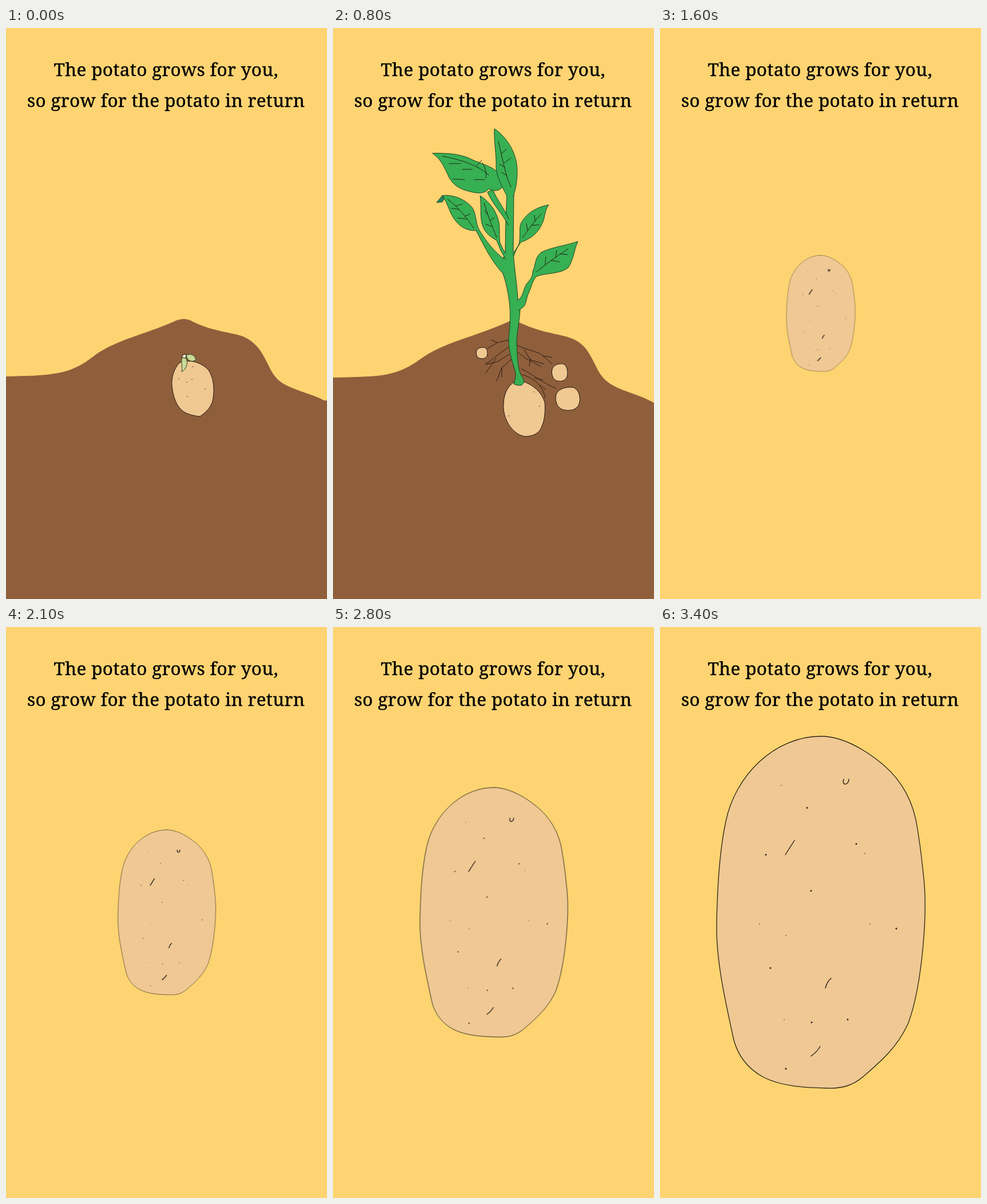
These frames come from a looping animation (561x998 px, 3.5 s). An HTML page without scripts:

```html
<!DOCTYPE html>
<html lang="en">
<head>
<meta charset="utf-8">
<title>The potato grows</title>
<style>
  html, body { margin: 0; width: 100%; height: 100%; overflow: hidden; background: #fed472; }
  svg { display: block; width: 100%; height: 100%; }
  text { font: 500 31.5px "Noto Serif", serif; letter-spacing: .32px; text-anchor: middle; stroke: #000; stroke-width: .4; }
  path { stroke-linejoin: round; stroke-linecap: round; }
  .soil { fill: #8f5f3c; }
  .tuber { fill: #f0c892; stroke: #1d150c; stroke-width: 1; }
  .green { fill: #37af53; stroke: #14351d; stroke-width: .9; }
  .line { fill: none; stroke: #1d150c; stroke-width: .9; }
  .dots { fill: none; stroke: #2a2015; stroke-width: 1.6; }
  #spud, .scar { vector-effect: non-scaling-stroke; }

  /* each growth stage holds for 200 ms */
  .stage { visibility: hidden; animation: flash 3.5s step-end infinite; animation-delay: calc(var(--i) * 200ms); }
  @keyframes flash {
    0% { visibility: visible; }
    5.7142%, 100% { visibility: hidden; }
  }
  .ground { animation: ground 3.5s step-end infinite; }
  @keyframes ground {
    0% { visibility: visible; }
    45.714%, 100% { visibility: hidden; }
  }
  /* the harvested potato swells in 100 ms steps */
  .harvest { transform-origin: 281px 498.8px; animation: swell 3.5s infinite; }
  @keyframes swell {
    0% { visibility: hidden; transform: scale(.33); animation-timing-function: step-end; }
    45.714% { visibility: visible; transform: scale(.33); animation-timing-function: steps(5); }
    59.999% { visibility: visible; transform: scale(.469); animation-timing-function: steps(7); }
    79.999% { visibility: visible; transform: scale(.709); animation-timing-function: steps(6); }
    97.142%, 100% { visibility: visible; transform: scale(1); }
  }
</style>
</head>
<body>
<svg viewBox="0 0 561 998" preserveAspectRatio="none">
<defs>
  <path id="spud" class="tuber" d="M-9.5-3C-8-9 0-10.5 5-9.5C10-7 10.5 0 9.5 4C8 9 3 10.5-2 9.7C-8 9-10.5 3-9.5-3Z"/>

  <g id="seed">
    <path class="tuber" d="M303 585C293 597 289 610 290 626C292 645 298 662 311 671C320 676 330 678 339 679C350 671 360 662 362 647C365 628 362 610 354 598C344 587 324 577 303 585Z"/>
    <path class="dots" d="M326 592h0M302 613h0M325 614h0M316 619h0M348 631h0M317 644h0"/>
  </g>

  <!-- young plant -->
  <g id="bulb">
    <path class="tuber" d="M317 618C303 628 297 643 298 665C300 690 317 712 337 714C351 713 361 708 365 696C371 684 371 662 370 654C365 637 350 624 333 618Z"/>
    <path class="dots" d="M351 636h0M307 678h0M361 661h0"/>
  </g>
  <path id="trunk" class="green" d="M316 622C318 613 321 607 318 599C313 582 307 565 307 545C309 520 311 500 308 478C305 455 300 435 293 419L301 390L302 335L304 290L316 291L315 390C317 425 323 455 323 478L327 493C325 520 321 535 321 550C322 570 322 592 329 608C336 615 334 621 330 624Q322 626 316 622Z"/>
  <g id="topLeaf">
    <path class="green" d="M304 294C297 280 287 262 285 245C286 220 281 200 282 176C303 190 322 218 322 250C322 272 318 285 315 294"/>
    <path class="line" d="M289 198C296 225 300 255 311 278M295 219l8-7M299 236l12-9M300 243l-9-5M304 258l-10-6"/>
  </g>
  <g id="smallRight">
    <path class="green" d="M315 394C320 385 326 380 326 372C328 358 324 346 331 337C342 321 357 313 377 309C369 321 371 332 365 343C358 360 342 370 329 374C324 380 320 387 316 398"/>
    <path class="line" d="M331 367C341 353 352 337 364 325M340 354l-2-12M347 345l13-1M353 337l-1-10"/>
  </g>
  <g id="bigRight">
    <path class="green" d="M322 476C333 471 332 457 338 448C344 440 349 436 349 426C355 412 352 402 364 392C382 383 408 380 428 373C421 388 421 404 411 419C398 430 372 428 356 434C349 440 347 452 342 463C338 470 338 484 332 488L324 494"/>
    <path class="line" d="M356 426C373 412 392 398 411 386M371 413l1-13M381 406l15 3M389 400l2-11M397 395l13 1"/>
  </g>
  <g id="centerLeaf">
    <path class="green" d="M302 404C295 394 291 384 286 371C276 366 265 358 261 344C256 328 260 312 257 293C274 304 286 320 290 340C292 354 290 366 292 376C296 383 298 390 302 394"/>
    <path class="line" d="M264 306C270 326 278 347 286 366M270 326l-5-7M274 337l8-6M278 347l-11-4"/>
  </g>
  <g id="leftLeaves">
    <path class="green" d="M307 345C296 325 278 307 270 287L279 282C286 300 299 314 307 334"/>
    <path class="green" d="M174 219C202 218 228 221 245 231C272 242 289 245 298 268C299 283 285 288 272 281C267 289 254 290 240 286C218 281 207 272 200 255C193 241 189 230 174 219Z"/>
    <path class="line" d="M191 224C220 230 250 237 272 257M203 237h20M226 247h17M209 264l21 1M247 265h18M261 236C267 246 269 255 267 262M251 241l9-10"/>
    <path class="green" d="M298 430C278 410 263 379 250 354C238 355 225 350 215 338C203 324 202 308 191 293C212 290 235 302 244 315C251 328 249 340 255 352C267 372 281 390 299 404"/>
    <path class="line" d="M200 299C219 313 234 332 246 350M214 311l12-3M220 317l-13-2M230 329l10-4M233 334l-15-2"/>
    <path class="green" style="fill:#20875f" d="M191 293L181 305L191 304L194 299Z"/>
  </g>
  <path id="roots" class="line" d="M308 545L287 550L276 545M287 550L270 560M308 557C292 567 281 579 267 587M285 578l-18 25M308 570L288 583L267 588M313 578L295 594L286 617M295 594v16M322 555C340 563 360 566 367 573L383 587M367 573l16 3M334 562L345 580L368 587M345 578l-2 13M322 566L336 577L364 592M329 596C350 605 365 620 390 630M331 606C352 612 366 625 371 646M352 612l15 3M362 624l10 8"/>
  <g id="babies">
    <use href="#spud" transform="translate(260 568)"/>
    <use href="#spud" transform="translate(396 602) scale(1.4 1.55)"/>
    <use href="#spud" transform="translate(410 648) scale(2.15 2.05)"/>
  </g>
  <g id="young">
    <use href="#roots"/><use href="#babies"/><use href="#bulb"/><use href="#trunk"/>
    <use href="#leftLeaves"/><use href="#topLeaf"/><use href="#smallRight"/><use href="#bigRight"/><use href="#centerLeaf"/>
  </g>

  <!-- full-grown plant -->
  <g id="grown">
    <path class="line" d="M314 583C290 592 262 600 218 600M284 594L277 586L254 584M262 599l-17 4M314 600L272 613L243 631L216 636M285 609L268 629L240 637M240 631l-14 8M304 641C285 658 260 665 240 676L236 686M290 654l-28 13M320 582L345 596L370 600L395 612M362 599l-7-7M320 590L350 603L374 604L372 617L361 627L372 637M372 617L390 630L402 648M388 602l16 4M310 643C340 646 362 664 385 677L412 687M352 656L383 661L400 662M304 653L328 680L352 684L370 692M328 680l8 9M352 684l12 8M362 682l16 7M380 686l12-12"/>
    <use href="#spud" transform="translate(196 611) scale(2.4 2.3)"/>
    <use href="#spud" transform="translate(193 654) scale(3.2 2.4)"/>
    <use href="#spud" transform="translate(236 710) scale(2.1 2.45)"/>
    <use href="#spud" transform="translate(417 615) scale(2.5 1.9)"/>
    <use href="#spud" transform="translate(371 646) scale(1.4 1.15)"/>
    <use href="#spud" transform="translate(423 667) scale(2.6 2.2)"/>
    <use href="#spud" transform="translate(427 717) scale(3.35 3.4)"/>
    <path class="tuber" d="M285 743C298 737 315 740 331 739C347 742 360 754 374 763C380 774 372 784 357 789C342 790 327 780 312 783C298 787 287 792 274 788C263 776 260 758 267 747Q274 741 285 743Z"/>
    <path class="dots" d="M320 745h2M272 768h1M365 772h2M207 598h1M180 643h2M208 668h1M228 696h2M247 697h1M434 611h1M376 643h1M409 653h1M440 678h1M427 698h1M452 724h1M405 714h1"/>
    <path class="green" d="M284 742C283 710 290 680 300 652C307 630 311 600 313 575C315 550 310 530 309 512C308 495 303 480 293 462C278 432 262 405 235 388L243 382C262 395 280 418 294 445C296 425 292 405 297 375C288 350 275 330 255 311L264 306C278 320 290 340 299 365C305 310 285 222 244 197V188C285 205 312 280 318 345V390C335 372 350 350 354 326L364 326C360 355 340 385 321 405C320 430 323 455 325 474C350 464 380 450 408 420L418 419C400 450 365 470 346 484C330 495 328 505 329 515C330 540 326 570 318 600C312 640 298 670 293 700L291 742Z"/>
    <path class="line" d="M299 365V378M294 445l1 4M318 390l-3 5"/>
    <path class="green" d="M82 205C106 204 110 186 135 173C160 160 190 155 212 158C235 162 248 178 245 196C234 200 222 207 215 220C200 235 182 241 166 241C144 239 126 224 110 211C100 207 91 208 82 205Z"/>
    <path class="green" d="M120 246C150 246 170 236 205 235C245 235 281 245 287 270C289 290 275 305 257 306C250 317 240 330 220 328C195 323 185 300 175 280C165 262 145 250 120 246Z"/>
    <path class="green" style="fill:#58ab45" d="M76 362C84 385 104 397 126 402Q145 405 164 411Z"/>
    <path class="green" d="M67 358C85 345 110 325 150 318C190 314 236 325 245 355C249 375 244 385 236 383C220 390 222 415 195 418C175 417 163 408 150 400C120 385 100 370 67 358Z"/>
    <path class="green" d="M472 206C450 200 430 204 415 215C395 230 357 228 337 245C319 262 311 288 318 303C328 318 349 325 363 325C367 336 387 342 408 340C430 335 433 310 433 280C431 245 440 212 472 206Z"/>
    <path class="green" d="M536 369C510 345 490 336 455 333C425 330 405 340 395 358C385 375 383 395 390 408C398 415 408 414 414 418C415 429 430 438 454 437C480 433 490 415 497 395C505 376 520 370 536 369Z"/>
    <path class="line" d="M103 208C145 205 195 193 245 194M134 193l15 6M148 184l17 13M186 178Q198 188 214 190M166 229Q179 222 184 205M151 219l17-13
      M139 248C180 258 225 275 257 306M172 264l25 2M200 291h23M203 295l14 1M203 249Q208 259 201 265M226 252Q232 266 225 280
      M80 359C125 359 185 364 241 382M105 345L134 359M126 339Q141 351 147 360M160 332Q178 347 181 365M124 379l28-15M151 386l29-9M181 392l14-17
      M440 217C416 252 387 288 363 325M372 238Q371 260 378 277M354 273Q355 293 364 304M397 265l28-9M386 281Q403 284 419 281M404 236l-1 24
      M512 356C475 364 438 385 414 418M425 364l5 25M448 347Q447 363 456 376M458 376l35 5M441 387l35 9M430 399l23 9M476 353l-7 13"/>
  </g>
</defs>

<rect width="561" height="998" fill="#fed472"/>
<path class="soil ground" d="M0 611C35 610 62 610 85 607C118 602 137 590 155 577C195 549 245 541 310 512C321 511 330 517 343 522C366 531 382 533 402 538C437 546 445 562 459 590C469 612 480 621 500 630C522 639 542 644 561 655V998H0Z"/>

<g class="stage" style="--i:0">
  <path class="soil" d="M0 609C35 608 62 608 85 604C118 599 137 586 154 573C192 545 240 537 298 511Q313 505 326 513C345 523 370 529 395 534C435 541 444 562 457 590C467 612 479 620 500 629C522 638 540 642 556 651L561 651V998H0Z"/>
  <use href="#seed"/>
  <path class="green" style="fill:#c9d996" d="M314 576L308 575C305 584 309 592 307 601C317 594 319 584 314 576Z"/>
  <path class="green" style="fill:#c9d996" d="M315 572C322 568 330 571 332 580C325 585 316 582 315 572Z"/>
  <path class="tuber" style="fill:#f5eed5" d="M307 575L311 570L316 572L313 577Z"/>
</g>

<g class="stage" style="--i:1">
  <use href="#seed"/>
  <path class="green" d="M310 586C314 560 307 530 309 495C310 470 309 445 311 425H318C317 460 322 490 320 520C321 550 321 570 319 588Z"/>
  <path class="green" d="M311 430C296 420 293 396 299 377C316 390 324 412 317 430"/>
  <path class="green" d="M318 470C325 447 340 435 361 432C357 453 342 468 318 480"/>
  <path class="line" d="M302 389L313 424M353 438L322 471"/>
</g>

<g class="stage" style="--i:2">
  <use href="#bulb"/><use href="#trunk"/><use href="#topLeaf"/><use href="#smallRight"/>
</g>

<g class="stage" style="--i:3">
  <use href="#roots"/><use href="#bulb"/><use href="#trunk"/><use href="#topLeaf"/>
  <use href="#smallRight"/><use href="#bigRight"/><use href="#centerLeaf"/>
</g>

<g class="stage" style="--i:4"><use href="#young"/></g>

<g class="stage" style="--i:5">
  <use href="#young"/>
  <use href="#spud" transform="translate(260 609) scale(1.5)"/>
  <use href="#spud" transform="translate(283 626) scale(1.2 1.3)"/>
</g>

<g class="stage" style="--i:6"><use href="#grown" transform="translate(15.9 25.8) scale(.95)"/></g>
<g class="stage" style="--i:7"><use href="#grown"/></g>

<g class="harvest">
  <path class="tuber" style="fill:#efc894;stroke:#2b2413;stroke-width:1.3" d="M281 191C312 191 346 207 378 231C412 256 437 291 447 336C453 368 457 400 460 430C465 470 464 510 460 555C455 610 446 660 434 692C415 735 385 760 355 786C335 803 315 807 290 806C252 805 213 803 181 787C155 773 137 751 129 722C112 645 98 580 99 520C100 460 103 395 115 340C131 260 200 191 281 191Z"/>
  <path class="line scar" style="stroke-width:1.3" d="M235 373L219 398M299 614Q292 620 289 631M280 733Q274 743 264 750M321 266C317 278 330 277 330 266"/>
  <path class="dots" style="stroke-width:3" d="M257 316h0M343 379h0M185 398h0M264 461h0M413 527h0M193 596h0M265 691h0M328 686h0M220 772h0"/>
  <path class="dots" d="M212 277h0M358 396h0M174 519h0M220 539h0M367 519h0M217 686h0"/>
</g>

<text x="279.7" y="83.5">The potato grows for you,</text>
<text x="279.7" y="137.5">so grow for the potato in return</text>
</svg>
</body>
</html>
```
